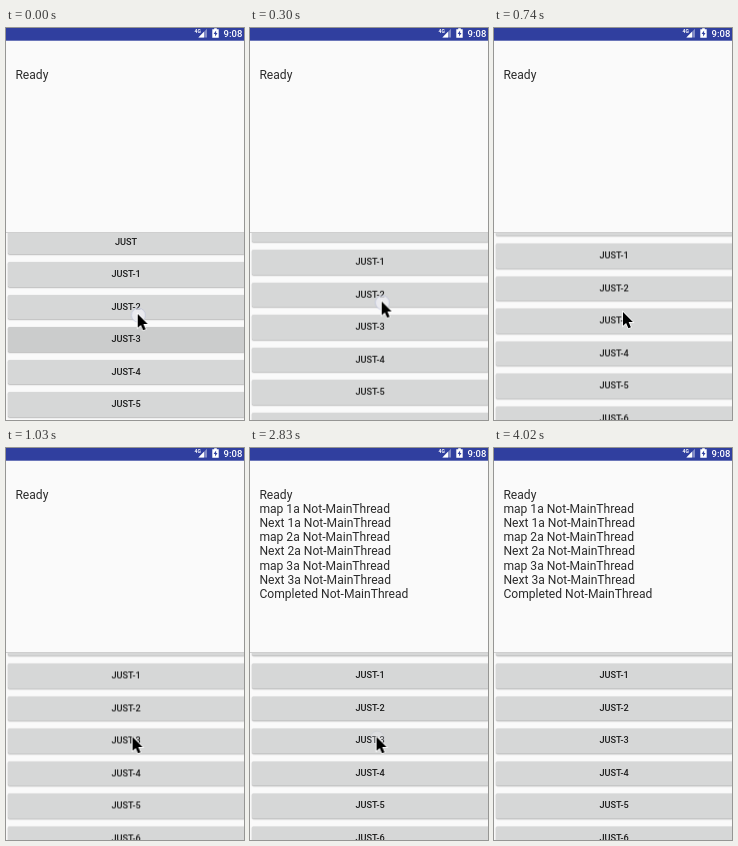
These frames come from a looping animation (238 px wide and 392 px high, 5.67 s). An HTML page:

```html
<!DOCTYPE html>
<html lang="en">
<head>
<meta charset="utf-8">
<title>Just demo</title>
<style>
  html, body { margin: 0; width: 100%; height: 100%; overflow: hidden; background: #fafafa; }
  #stage { position: relative; width: 238px; height: 392px; overflow: hidden; background: #fafafa; font-family: Roboto, sans-serif; }
  #stage > *, .row { position: absolute; }

  .status { left: 0; top: 0; width: 238px; height: 13px; }

  .log { left: 9.4px; top: 39.8px; font-size: 12.1px; line-height: 14.17px; color: #2b2b2b; white-space: pre; }
  .output { animation: output 5670ms step-end infinite; }

  .list { left: 0; top: 205px; width: 238px; height: 187px; overflow: hidden; }
  .edge { left: 0; top: 204px; width: 238px; height: 1px; background: #cfcfcf; }
  .rows { position: absolute; inset: 0; animation: scroll 5670ms step-end infinite; }
  .row {
    left: 1.5px; width: 237px; height: 24.4px; top: calc(-3.2px + var(--i) * 32.5px);
    border-radius: 1.4px; background: #d6d7d7; box-shadow: 0 .8px 1.5px rgba(0, 0, 0, .32);
    font: 500 9.2px/24.4px Roboto, sans-serif; color: #1c1c1c; text-align: center;
  }
  .pressed { animation: release 5670ms step-end infinite; }

  .pointer { left: 0; top: 0; width: 24px; height: 30px; overflow: visible; animation: pointer 5670ms step-end infinite; }
  .touch { animation: touch 5670ms step-end infinite; }

  @keyframes scroll {
    0% { transform: translateY(0); }
    2.645% { transform: translateY(-6px); }
    5.291% { transform: translateY(-12.3px); }
    7.936% { transform: translateY(-17.5px); }
    10.405% { transform: translateY(-18.1px); }
    13.051%, 100% { transform: translateY(-18.6px); }
  }
  @keyframes release {
    0% { background: #cbcccc; }
    2.645%, 100% { background: #d6d7d7; }
  }
  @keyframes output {
    0% { visibility: hidden; }
    49.911%, 100% { visibility: visible; }
  }
  @keyframes pointer {
    0% { transform: translate(131.7px, 286px); }
    2.645% { transform: translate(131.7px, 279.5px); }
    5.291% { transform: translate(131.7px, 273.5px); }
    7.936% { transform: translate(131.7px, 270px); }
    10.405% { transform: translate(131px, 273px); }
    13.051% { transform: translate(129px, 284px); }
    15.696% { transform: translate(127.8px, 290.3px); }
    18.165% { transform: translate(126.6px, 289px); }
    60.317% { transform: translate(134.6px, 303px); }
    62.962% { transform: translate(160px, 331.5px); }
    65.608% { transform: translate(158.3px, 328.5px); }
    68.253% { transform: translate(167.6px, 348.5px); }
    70.899%, 100% { transform: translate(-40px, -40px); }
  }
  @keyframes touch {
    0% { opacity: 1; }
    10.405% { opacity: 0; }
    47.266% { opacity: 1; }
    49.911% { opacity: .35; }
    52.557%, 100% { opacity: 0; }
  }
</style>
</head>
<body>
<div id="stage">
  <svg class="status" viewBox="0 0 238 13">
    <rect width="238" height="12.7" fill="#303f9f"/>
    <g fill="#fff" font-family="Roboto, sans-serif">
      <text x="188.6" y="4.6" font-size="5" font-weight="700">4G</text>
      <path d="M201 .8V9.4H192.4Z" opacity=".4"/>
      <path d="M198 3.8V9.4H192.4Z"/>
      <path d="M208.2 .3h2.6v1h1.9v8.4h-6.4V1.3h1.9Z"/>
      <path d="M210.1 2.4 207.6 6h1.5v2.5L211.5 5H210.1Z" fill="#303f9f"/>
      <text x="217.6" y="8.7" font-size="9.5" font-weight="500">9:08</text>
    </g>
  </svg>

  <div class="log">Ready
<span class="output">map 1a Not-MainThread
Next 1a Not-MainThread
map 2a Not-MainThread
Next 2a Not-MainThread
map 3a Not-MainThread
Next 3a Not-MainThread
Completed Not-MainThread</span></div>

  <div class="edge"></div>
  <div class="list">
    <div class="rows">
      <div class="row" style="--i:0">JUST</div>
      <div class="row" style="--i:1">JUST-1</div>
      <div class="row" style="--i:2">JUST-2</div>
      <div class="row pressed" style="--i:3">JUST-3</div>
      <div class="row" style="--i:4">JUST-4</div>
      <div class="row" style="--i:5">JUST-5</div>
      <div class="row" style="--i:6">JUST-6</div>
    </div>
  </div>

  <svg class="pointer" viewBox="0 0 24 30">
    <circle class="touch" cx=".6" cy="1.2" r="7" fill="rgba(240,240,245,.78)" stroke="rgba(150,160,205,.45)" stroke-width=".8"/>
    <path d="M0 0V13.8L3.1 11 5.4 16.3 7.9 15.2 5.6 10.1H9.9Z" fill="#000" stroke="#fff" stroke-width="1.4" paint-order="stroke"/>
  </svg>
</div>
</body>
</html>
```
